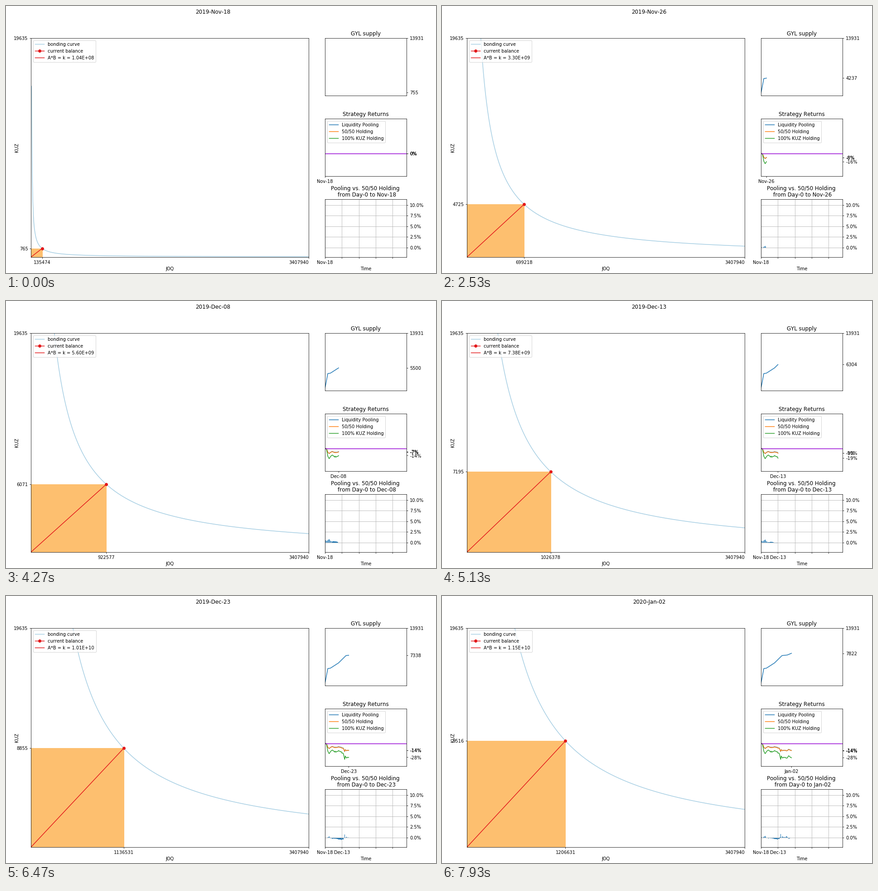
A matplotlib script for the animation above (8 s loop, 949 by 590 pixels).

```python
import numpy as np
import matplotlib.pyplot as plt
from matplotlib.animation import FuncAnimation

W, H, DPI = 949, 590, 71.3
LOOP, STEP = 8000, 50
HOLD, DAY_MS = 1290, 146.8
COIN_A, COIN_B, SHARE = "JOQ", "KUZ", "GYL"
MAX_A, MAX_B, MAX_SHARES, SPAN = 3407940, 19635, 13931, 121
PALE, RED, ORANGE, VIOLET = "#a6cee3", "#e31a1c", "#fdbf6f", "#9400d3"

# Key states of the pool: day, both balances, shares
KEYS = np.array([
    (0, 135474, 765, 755), (1, 269693, 1537, 1508), (8, 699218, 4725, 4237),
    (20, 922577, 6071, 5500), (31, 1123409, 8778, 7269),
    (39, 1138857, 9017, 7407), (45, 1206631, 9516, 7822)])
# Turning points of the price between them
TURNS = [(2, 174), (4, 150), (6, 141), (10, 153), (16, 146), (27, 142),
         (29, 121), (30, 133), (41, 134)]

key_day, key_a, key_b, key_shares = KEYS.T
days = np.arange(key_day[-1] + 1)

knots = dict(TURNS) | dict(zip(key_day, key_a / key_b))
knot_days = sorted(knots)
noise = np.random.default_rng(4).normal(0, 1.2, len(days))
noise[knot_days] = 0
price = np.interp(days, knot_days, [knots[d] for d in knot_days]) + noise

# Shares are minted quickly until day 4
supply = np.interp(days, np.insert(key_day, 2, 4), np.insert(key_shares, 2, 4130)).round()
growth = np.interp(days, key_day, np.sqrt(key_a * key_b) / key_shares)
bal_a = growth * supply * np.sqrt(price)
bal_b = growth * supply / np.sqrt(price)

pool = bal_a / supply
pool = pool / pool[0]
coin = price / price[0]
half = (1 + coin) / 2


def date(day):
    for month, first, length in (("Nov", -17, 30), ("Dec", 13, 31), ("Jan", 44, 31)):
        if day < first + length:
            return f"{month}-{day - first + 1:02d}"


def panel(left, top, right, bottom):
    return fig.add_axes([left / W, 1 - bottom / H, (right - left) / W, (bottom - top) / H])


def label(x, y, text="", size=12, **kw):
    return fig.text(x / W, 1 - y / H, text, fontsize=size, ha="center", **kw)


plt.rcParams.update({"font.family": "DejaVu Sans", "text.kerning_factor": 6})
fig = plt.figure(figsize=((W + 0.01) / DPI, (H + 0.01) / DPI), dpi=DPI, facecolor="white")
heading = label(457, 16.5)

# Bonding curve
main = panel(55.4, 70.8, 668.4, 554.6)
main.set(xlim=(0, MAX_A), ylim=(0, MAX_B))
main.set_xlabel(COIN_A)
label(23.5, 313, COIN_B, 10, va="center", rotation=90)
curve_x = np.linspace(6768, MAX_A, 500)
area = plt.Rectangle((0, 0), 0, 0, color=ORANGE, lw=1)
main.add_patch(area)
curve, = main.plot([], [], color=PALE, label="bonding curve")
ray, = main.plot([0, 0], [0, 0], "o-", color=RED, markevery=[1], label="current balance")
main.plot([], [], color=RED, label="k")
k_text = main.legend(loc="upper left").get_texts()[2]

# Share supply
shares = panel(704.2, 70.6, 884.4, 198.2)
shares.set(xlim=(0, SPAN), ylim=(0, MAX_SHARES), xticks=[])
shares.set_title(f"{SHARE} supply")
share_line, = shares.plot([], [])

# Strategy returns
returns = panel(704.2, 248.8, 884.4, 376.5)
returns.set(xlim=(0, SPAN), ylim=(-0.453, 0.682))
returns.set_title("Strategy Returns")
strategies = [(pool, "Liquidity Pooling"), (half, "50/50 Holding"),
              (coin, f"100% {COIN_B} Holding")]
return_lines = [returns.plot([], [], label=name)[0] for _, name in strategies]
returns.axhline(0, color=VIOLET)
returns.legend(loc="upper left")

# Pooling against holding for each starting day
versus = panel(704.2, 427, 884.4, 554.6)
versus.set(xlim=(0, SPAN), ylim=(-0.0223, 0.1133))
levels = np.linspace(0, 0.1, 5)
versus.set_yticks(levels, [f"{v:.1%}" for v in levels])
versus.grid(True)
versus.set_xlabel("Time")
bars = versus.bar(days, np.zeros(len(days)), color="C0")
label(792.4, 406.5, "Pooling vs. 50/50 Holding")
versus_title = label(796, 421)

for ax in (shares, returns, versus):
    ax.yaxis.tick_right()


def update(i):
    day = max(0, int((i * STEP - HOLD) / DAY_MS))
    past = days[:day + 1]
    a, b = bal_a[day], bal_b[day]
    year = 2019 if day < 44 else 2020
    heading.set_text(f"{year}-{date(day)}")

    curve.set_data(curve_x, a * b / curve_x)
    ray.set_data([0, a], [0, b])
    area.set(width=a, height=b)
    k_text.set_text(f"A*B = k = {a * b:.2E}")
    main.set_xticks([a, MAX_A], [f"{a:.0f}", str(MAX_A)])
    main.get_xticklabels()[1].set_ha("right")
    main.set_yticks([b, MAX_B], [f"{b:.0f}", str(MAX_B)])

    share_line.set_data(past, supply[:day + 1])
    shares.set_yticks([supply[day], MAX_SHARES], [f"{supply[day]:.0f}", str(MAX_SHARES)])

    now = [values[day] - 1 for values, _ in strategies]
    for line, (values, _) in zip(return_lines, strategies):
        line.set_data(past, values[:day + 1] - 1)
    returns.set_yticks(now, [f"{v:.0%}" for v in now])
    returns.set_xticks([day], [date(day)])

    gap = pool[day] / pool - half[day] / half
    for d, bar in enumerate(bars):
        bar.set_height(gap[d])
        bar.set_visible(d < day)
    marks = range(0, 101, 25)
    versus.set_xticks(marks, [date(m) if m <= day else "" for m in marks])
    versus_title.set_text(f"from Day-0 to {date(day)}")
    return []


anim = FuncAnimation(fig, update, frames=LOOP // STEP, interval=STEP,
                     init_func=lambda: update(0), repeat=True, repeat_delay=0)
plt.show()
```
